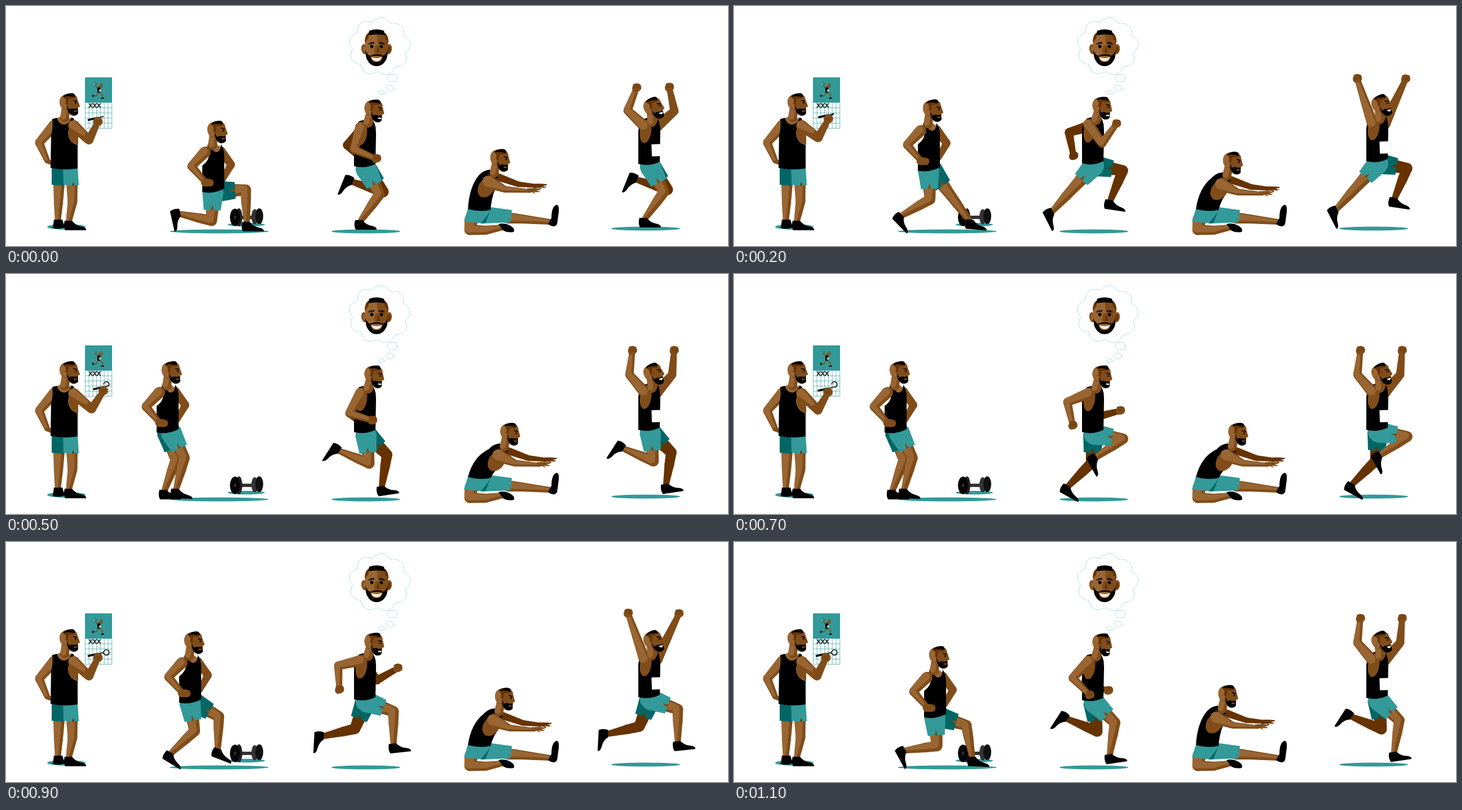
An HTML page with a canvas for the animation above (1200 ms loop, 1280 by 427 pixels).

```html
<!DOCTYPE html>
<html lang="en">
<head>
<meta charset="utf-8">
<title>Training plan</title>
<style>
html, body { margin: 0; width: 100%; height: 100%; overflow: hidden; background: #fff; }
canvas { display: block; }
</style>
</head>
<body>
<canvas id="stage" width="1280" height="427"></canvas>
<script>
const g = document.getElementById('stage').getContext('2d');
const LIGHT = '#996633', MID = '#804d1a', DARK = '#663300';
const TEAL = '#339999', DEEP = '#006666', BLACK = '#000';

const STEP = 100, STEPS = 12;
const lerp = (a, b, k) => a + (b - a) * k;
const mix = (p, q, k) => p.map((v, i) => lerp(v, q[i], k));
const clamp = v => Math.min(1, Math.max(0, v));

// Point on a closed Catmull-Rom curve through evenly timed keys.
function loop(keys, u) {
  const n = keys.length, i = Math.floor(u), f = u - i;
  const [a, b, c, d] = [-1, 0, 1, 2].map(j => keys[(i + j + n) % n]);
  return a.map((p, k) => b[k] + f / 2 * (c[k] - p +
    f * (2 * p - 5 * b[k] + 4 * c[k] - d[k] + f * (3 * (b[k] - c[k]) + d[k] - p))));
}

// Middle joint of a two-bone limb; side picks the way it bends.
function bend([x1, y1], [x2, y2], upper, lower, side) {
  const dx = x2 - x1, dy = y2 - y1, d = Math.hypot(dx, dy);
  const a = d < upper + lower
    ? (d * d + upper * upper - lower * lower) / (2 * d)
    : d * upper / (upper + lower);
  const h = side * Math.sqrt(Math.max(0, upper * upper - a * a));
  return [x1 + (dx * a + dy * h) / d, y1 + (dy * a - dx * h) / d];
}

// ---- drawing helpers ----
function fill(col, d) {
  g.fillStyle = col;
  g.fill(new Path2D(d));
}

function stroke(col, w, d) {
  g.strokeStyle = col;
  g.lineWidth = w;
  g.stroke(new Path2D(d));
}

function oval(col, x, y, rx, ry, rot = 0) {
  g.fillStyle = col;
  g.beginPath();
  g.ellipse(x, y, rx, ry, rot, 0, 7);
  g.fill();
}

function at(x, y, rot, draw) {
  g.save();
  g.translate(x, y);
  g.rotate(rot);
  draw();
  g.restore();
}

function quad(col, x1, y1, r1, x2, y2, r2) {
  const len = Math.hypot(x2 - x1, y2 - y1) || 1;
  const nx = (y1 - y2) / len, ny = (x2 - x1) / len;
  g.fillStyle = col;
  g.beginPath();
  g.moveTo(x1 + nx * r1, y1 + ny * r1);
  g.lineTo(x2 + nx * r2, y2 + ny * r2);
  g.lineTo(x2 - nx * r2, y2 - ny * r2);
  g.lineTo(x1 - nx * r1, y1 - ny * r1);
  g.fill();
}

// Chain of [x, y, radius] joints, with an optional lighter side.
function limb(col, pts, hi, d = 3) {
  pts.forEach(([x, y, r], i) => {
    oval(col, x, y, r, r);
    if (i) quad(col, ...pts[i - 1], x, y, r);
  });
  if (hi) limb(hi, pts.map(([x, y, r]) => [x - d * 0.8, y - d * 0.6, Math.max(r - d, 1)]));
}

// ---- body parts ----
function shoe(x, y, rot) {
  at(x, y, rot, () =>
    fill(BLACK, 'M-8,-4L5,-4Q11,4 21,6Q31,8 30,13L-7,13Q-11,6 -8,-4Z'));
}

function fist(x, y, col) {
  at(x, y, 0, () => {
    fill(col, 'M-6,-7Q0,-10 6,-7Q9,-4 8,2Q5,7 -3,7Q-8,6 -8,0Z');
    stroke(DARK, 0.8, 'M-3,-7L-3,-2M1,-8L1,-2M5,-7L4,-2M-5,0L6,-1');
  });
}

function arm(sh, ha, side, col, hi, hand = col) {
  const el = bend(sh, ha, 41, 43, side);
  limb(col, [[...sh, 10], [...el, 7.5], [...ha, 5]], hi, 2.5);
  fist(...ha, hand);
}

function leg(hip, ankle, rot, col, hi, shorts) {
  const knee = bend(hip, ankle, 52, 61, 1);
  const calf = mix(knee, ankle, 0.35), hem = mix(hip, knee, 0.64);
  limb(col, [[...hip, 14], [...knee, 9.5], [...calf, 8.5], [...ankle, 5]], hi, 3.5);
  shoe(...ankle, rot);
  oval(shorts, ...hip, 18, 18);
  quad(shorts, ...hip, 19, ...hem, 15);
  quad(col, ...hem, 3, ...mix(hem, hip, 0.3), 0);
}

function head(x, y, rot, mood) {
  at(x, y, rot, () => {
    limb(MID, [[-7, 9, 7.5], [-9, 24, 8]], LIGHT, 3);
    fill(MID, 'M-18,-3C-19,-14 -10,-19 0,-19Q13,-19 14,-8L18,3Q18,5 15,5L14,16Q9,21 3,19L-6,11Q-17,9 -18,-3Z');
    fill(LIGHT, 'M-18,-3C-18,-12 -12,-15 -7,-15L-6,-4L-5,11Q-17,9 -18,-3Z');
    fill(DARK, 'M-12,-14L10,-15L8,-11L-2,-10L-4,3L-8,3L-7,-8Z');
    oval(MID, -8, 4, 4, 6);
    oval(LIGHT, -8.5, 4, 3, 5);
    fill(BLACK, 'M-12,-13Q-7,-20 4,-20Q10,-20 9,-13Q-2,-16 -12,-13Z');
    fill(BLACK, 'M-5,2L-1,9Q4,6 8,8L14,7L15,16Q12,21 5,20Q-4,17 -5,2Z');
    stroke(BLACK, 1.8, 'M6,-7L13,-5');
    if (mood) {
      stroke(BLACK, 1.3, 'M8,-2L13,-2');
      fill('#fff', mood > 0 ? 'M6,10L14,9Q13,13 10,13Z' : 'M7,13Q10,10 14,12L13,14Z');
    } else {
      oval(BLACK, 10.5, -2, 1.5, 1.7);
      oval(MID, 10, 12, 3.2, 1.3);
    }
  });
}

// ---- wall planner ----
function planner() {
  g.fillStyle = TEAL;
  g.fillRect(140, 127, 48, 45);
  let grid = '';
  for (let i = 0; i < 8; i++) grid += `M${140.4 + i * 6.75},172V218`;
  for (let i = 1; i < 6; i++) grid += `M140,${172 + i * 9.1}H188`;
  stroke('#5fb3b3', 0.9, grid);
  for (let i = 0; i < 3; i++) {
    at(147 + i * 7.3, 173, 0, () => stroke(BLACK, 1.3, 'M0,0L6,8M6,0L0,8'));
  }
  stroke(MID, 1.8, 'M164,147L159,143L160,137M167,147L171,142L168,137M164,154L159,160L154,159M166,154L171,157L171,163');
  oval(MID, 166, 143, 2.3, 3);
  fill(BLACK, 'M162,145H167V154H162ZM153,158L155,158L156,161L153,162ZM169,163L174,163L173,165L168,165Z');
  g.fillStyle = '#fff';
  g.fillRect(165, 149, 3, 3);
}

function plannerMan(n) {
  oval(TEAL, 107, 393, 34, 5);
  planner();
  const a = Math.PI * (1 + Math.min(n * 41, 360) / 180);
  const tip = [178 + 5 * Math.cos(a), 196.5 + 5 * Math.sin(a)];
  g.strokeStyle = BLACK;
  g.lineWidth = 1.5;
  g.beginPath();
  if (n) g.arc(178, 196.5, 4.8, Math.PI, a);
  g.stroke();

  limb(MID, [[94, 316, 10], [93, 350, 8], [92, 384, 5]], LIGHT, 3);
  fill(BLACK, 'M85,380H100L104,394Q94,398 83,395Z');
  limb(MID, [[117, 316, 10], [118, 348, 8.5], [111, 386, 5]], LIGHT, 3);
  shoe(112, 386, 0);
  fill(DEEP, 'M81,286L105,286L102,320L81,318Z');
  fill(TEAL, 'M101,286H127L129,319L121,319L119,313L116,320L102,318Z');
  fill(DARK, 'M117,320L119,313L121,319Z');

  limb(MID, [[86, 212, 10], [59, 243, 7.5], [73, 275, 5]], LIGHT, 2.5);
  fill(MID, 'M69,275L79,274L80,283L70,279Z');
  fill(LIGHT, 'M82,202L100,196L118,201L126,214L100,228L82,222Z');
  fill(BLACK, 'M82,201L90,199Q94,211 103,211Q113,210 116,198L121,201Q108,215 111,232Q115,245 127,247L127,289Q103,293 79,288L80,230Q84,216 82,201Z');
  fill(MID, 'M121,202Q108,215 111,232Q115,245 128,247L128,210Z');
  const el = [147 + (tip[0] - 173) * 0.5, 238 + (tip[1] - 196) * 0.8];
  const ha = [tip[0] - 10, tip[1] + 10];
  limb(MID, [[120, 213, 10], [...el, 8], [...ha, 5]]);
  limb(LIGHT, [[118, 211, 7], [el[0] - 10, el[1] - 12, 4]]);
  at(...tip, 0, () => {
    stroke(BLACK, 3.4, 'M-28,6.5L-9,2.2');
    stroke(BLACK, 1.6, 'M-10,2.4L0,0');
  });
  oval(MID, ha[0], ha[1] - 1, 8.5, 8);
  stroke(DARK, 0.8, `M${ha[0] - 5},${ha[1] - 1}l10,-2m-9,5l9,-2`);
  head(113, 175, 0, 0);
}

// ---- lunge: kneel, step, lift, stand, and back again ----
const BODY = [[0, 0], [-22, -38], [-60, -52], [-81, -49]];
const FRONT = [[427, 388], [419, 384], [332, 359], [301, 386]];

function along(keys, u) {
  const i = Math.min(Math.floor(u), keys.length - 2);
  return mix(keys[i], keys[i + 1], u - i);
}

function dumbbell() {
  oval(TEAL, 426, 389, 33, 3.3);
  oval('#333', 441, 375, 6, 13.5);
  oval('#111', 449, 374, 7, 14);
  g.fillStyle = '#333';
  g.fillRect(414, 373, 27, 6);
  oval('#222', 413, 376, 6, 16);
  oval('#050505', 406, 376, 9, 15.5);
  oval('#333', 406, 376, 2, 3);
}

function lunge(n) {
  const s = Math.min(n, STEPS - n);
  const u = Math.min(3, Math.max(s / 2, s - 2));
  const upright = u === 3;
  const [x, y] = along(BODY, u), toe = along(FRONT, u);
  const ease = (1 - u / 3) ** 1.3, tilt = 1.35 * ease;
  const heel = [280 + 25 * ease, 388 - 19 * Math.sin(tilt)];
  oval(TEAL, 378, 401, 88, 3.5);
  dumbbell();
  limb(MID, [[381 + x, 258 + y, 8], [399 + x, 282 + y, 7], [385 + x, 308 + y, 5]]);
  const far = () => leg([373 + x, 330 + y], toe, (388 - toe[1]) / 45, MID, LIGHT, upright ? TEAL : DEEP);
  const near = () => leg([367 + x, 330 + y], heel, tilt, MID, LIGHT, upright ? DEEP : TEAL);
  (upright ? [near, far] : [far, near]).forEach(draw => draw());
  at(x, y, 0, () => {
    fill(LIGHT, 'M350,255Q360,244 374,246L388,258L370,270Z');
    fill(BLACK, 'M357,247L362,246Q366,260 374,260Q381,258 381,246Q387,254 387,268L387,325Q368,335 348,331L348,284Q361,274 360,262Q359,253 357,247Z');
    limb(MID, [[353, 260, 10], [329, 285, 7.5], [353, 313, 5]], LIGHT, 3);
    fill(MID, 'M348,308Q359,305 367,310Q371,317 364,321L350,321Q342,316 348,308Z');
    head(375, 224, 0, 0);
  });
}

// ---- running ----
// ankle and foot angle through one stride; hand through one swing
const STRIDE = [
  [627, 385, 0], [562, 368, 1.1], [570, 325, 2],
  [611, 312, 1.95], [666, 349, 0.15], [693, 373, -0.12]
];
const SWING = [[657, 272], [678, 210], [674, 243], [622, 273], [588, 263], [605, 265]];

function runner(n, dx, dy, cheer) {
  oval(TEAL, cheer ? 1134 : 638, cheer ? 396 : 401, 61, 3.6);
  const m = (n + 6) % STEPS;
  const lift = Math.abs(Math.sin(n * Math.PI / 6)), bob = 5 * (1 - lift) ** 2;
  const step = (i, ...cols) => {
    const [x, y, rot] = loop(STRIDE, i / 2);
    leg([638, 284 + bob], [x, y], rot, ...cols);
  };
  const rise = (sx, from, to, ...rest) => arm([sx, 213 + bob], mix(from, to, lift), ...rest);

  at(dx, dy, 0, () => {
    if (cheer) {
      rise(650, [672, 149], [689, 132], -1, MID, null);
    } else {
      const [x, y] = loop(SWING, m / 2);
      arm([633, 213 + bob], [x + 14, y + 4], -1, DARK, null, n > 6 ? MID : DARK);
    }
    step(m, DARK, null, DEEP);
    step(n, MID, LIGHT, TEAL);
    at(0, bob, 0, () => {
      fill(MID, 'M624,208L636,196L650,197L656,212L640,222Z');
      fill(BLACK, 'M626,200L633,198Q638,210 646,210Q652,208 651,199Q656,208 656,222L655,276Q637,285 617,280L617,222Q618,207 626,200Z');
      oval(MID, 630, 222, 10, 21, 0.15);
    });
    if (cheer) {
      rise(628, [614, 150], [599, 131], 1, MID, LIGHT);
      at(651, 256 + bob, -0.03, () => {
        g.fillStyle = '#fff';
        g.fillRect(-10, -11, 20, 21);
        stroke('#e4e9e9', 0.6, 'M-10,-11H10V10H-10Z');
      });
    } else {
      arm([629, 211 + bob], loop(SWING, n / 2), -1, MID, LIGHT);
    }
    head(cheer ? 645 : 653, 181 + bob, cheer ? -0.2 : 0.12, cheer ? 1 : -1);
  });
}

// ---- thought bubble ----
function thought() {
  const lobes = 9;
  const rim = (i, k) => {
    const a = 0.25 + i / lobes * Math.PI * 2;
    return `${662 + 50 * k * Math.cos(a)},${72 + 47 * k * Math.sin(a)}`;
  };
  let d = 'M' + rim(0, 0.95);
  for (let i = 1; i <= lobes; i++) d += `Q${rim(i - 0.5, 1.3)} ${rim(i, 0.95)}`;
  g.save();
  g.setLineDash([2, 1.6]);
  stroke('#6bbaba', 0.9, d);
  for (const [x, y, rx, ry] of [[685, 128, 9, 6.5], [681, 146, 7, 5], [666, 154, 5, 3.3]]) {
    g.beginPath();
    g.ellipse(x, y, rx, ry, 0, 0, 7);
    g.stroke();
  }
  g.restore();

  at(657, 75, 0, () => {
    for (const s of [-1, 1]) {
      oval(MID, s * 22, 2, 5, 9, s * 0.15);
      oval(s < 0 ? LIGHT : DARK, s * 22, 2, 2, 5);
    }
    fill(LIGHT, 'M-21,-12Q-20,-29 0,-30Q20,-29 21,-12L19,15Q10,31 0,31Q-10,31 -19,15Z');
    fill(MID, 'M0,-30Q20,-29 21,-12L19,15Q10,31 0,31L4,10Z');
    fill(DARK, 'M-21,-10Q-21,-25 -13,-28L-15,-17ZM21,-10Q21,-25 13,-28L15,-17Z');
    fill(BLACK, 'M-15,-23L-13,-31Q0,-36 13,-31L15,-23Q0,-26 -15,-23Z');
    fill(BLACK, 'M-20,3Q-15,15 -10,13Q0,8 10,13Q15,15 20,3L18,18Q12,32 0,32Q-12,32 -18,18Z');
    fill(LIGHT, 'M-11,15Q0,12 11,15Q9,25 0,25Q-9,25 -11,15Z');
    fill('#fff', 'M-9,16Q0,20 9,16Q7,23 0,23Q-7,23 -9,16Z');
    fill(MID, 'M-2,-5L3,-5L6,8Q0,11 -5,8Z');
    fill(DARK, 'M2,-5L6,8Q2,10 0,9Z');
    for (const s of [-1, 1]) {
      oval(BLACK, s * 8.5, -3, 2.8, 3.2);
      stroke(BLACK, 2.2, `M${s * 4},-9Q${s * 9},-11 ${s * 14},-7`);
    }
  });
}

// ---- seated stretch ----
function palm(x, y, col) {
  at(x, y, 0, () => {
    fill(col, 'M-12,-3.5Q-2,-5 13,-3Q14,-1 5,0L12,2Q9,4 2,2.5L-11,4Z');
    stroke(col, 1.5, 'M-8,0L3,5');
  });
}

function stretch(n) {
  const k = clamp(0.65 + 0.66 * Math.cos((n - 5.5) * Math.PI / 6));
  const x = 18 * k, y = 10.5 * k;
  const to = (px, py) => [px + x, py + y];
  limb(DARK, [[...to(866, 302), 7], [...to(908, 317), 5], [...to(940, 320), 3.2]]);
  palm(...to(946, 320), DARK);

  limb(MID, [[890, 377, 10], [915, 379, 8], [964, 384, 5]], LIGHT, 3);
  fill(BLACK, 'M961,388L967,377Q967,358 975,354Q981,352 980,366L977,388Q972,396 961,388Z');
  limb(MID, [[825, 381, 12], [822, 398, 9.5], [850, 399, 8], [880, 394, 5]], LIGHT, 3);
  fill(BLACK, 'M873,388Q885,385 896,392Q903,397 900,402Q889,404 881,399Z');
  fill(TEAL, 'M819,360L860,358L897,363L894,385L845,387L812,383Z');
  fill(DEEP, 'M858,366L850,386L842,387Z');

  const sh = to(838, 301), nk = to(857, 291), ch = to(872, 299), ap = to(867, 325);
  fill(BLACK, `M819,361Q${821 + x * 0.4},${322 + y * 0.3} ${sh}Q${to(846, 292)} ${nk}L${ch}L${ap}` +
    `Q${860 + x * 0.4},${344 + y * 0.2} 859,363Q838,367 819,361Z`);
  oval(MID, ...to(852, 322), 14, 20, 0.6);
  limb(MID, [[...to(856, 313), 12], [...to(884, 326), 6], [...to(928, 329), 3.2]], LIGHT, 2.5);
  palm(...to(935, 328), MID);
  head(876 + x, 274 + y, 0.08, 0);
}

function draw() {
  const n = Math.floor(performance.now() / STEP) % STEPS;
  g.fillStyle = '#fff';
  g.fillRect(0, 0, 1280, 427);
  plannerMan(n);
  lunge(n);
  thought();
  runner(n, 0, 0, false);
  stretch(n);
  runner(n, 504, -4, true);
  requestAnimationFrame(draw);
}
draw();
</script>
</body>
</html>
```
